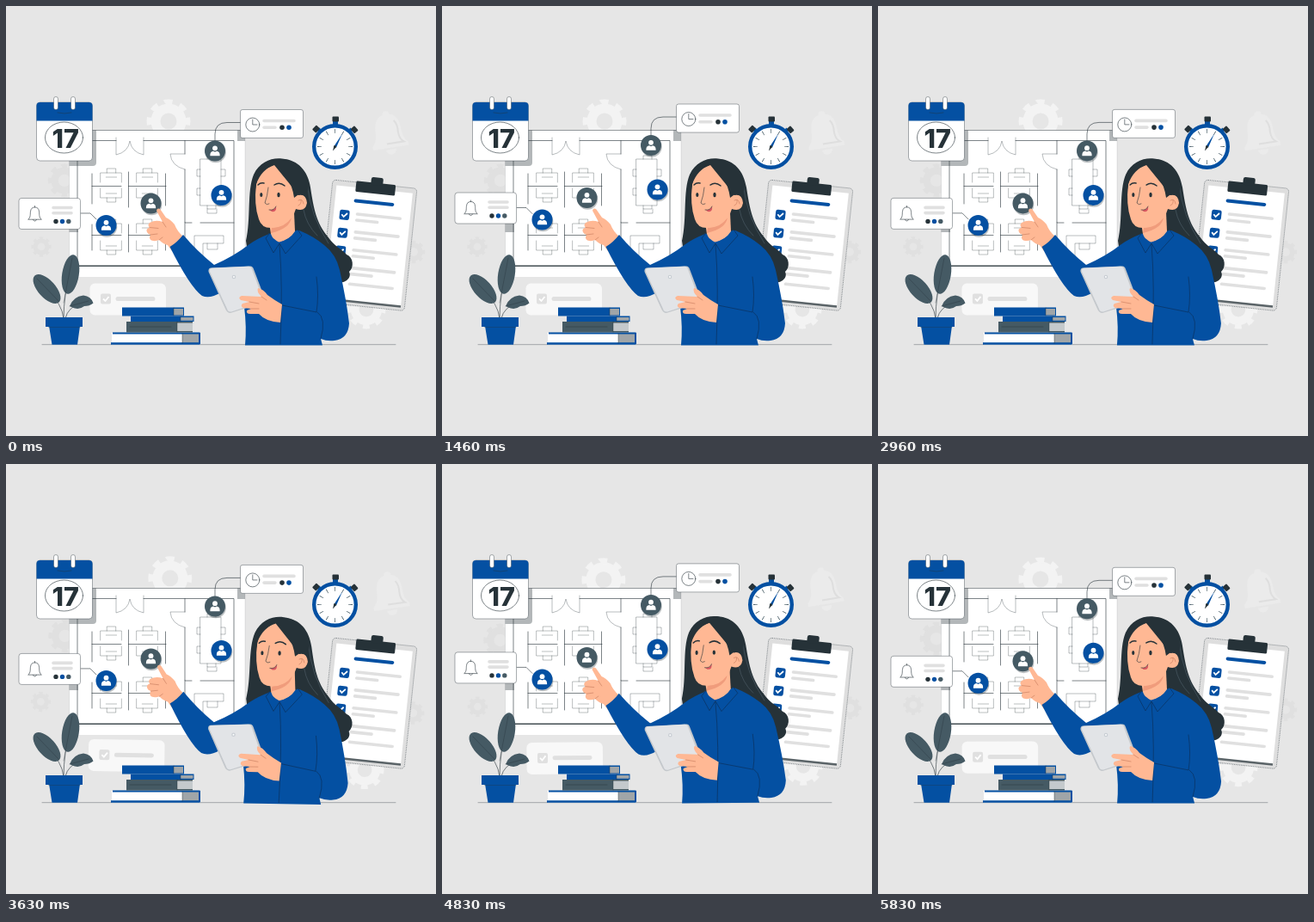
An HTML page that plays this animation: 500x500 px, repeating every 5870 ms.

```html
<!DOCTYPE html>
<html lang="en">
<head>
<meta charset="utf-8">
<title>Office planning</title>
<style>
html, body { margin: 0; width: 100%; height: 100%; overflow: hidden; background: #e6e6e6; }
svg { display: block; width: 100%; height: 100%; }
.blue { fill: #0450a2; }
.dark { fill: #263238; }
.slate { fill: #455a64; }
.white { fill: #fff; }
.grey { fill: #e0e0e0; }
.pages { fill: #a0a5a8; }
.skin { fill: #ffb894; }
.line { fill: none; stroke: #263238; stroke-width: .6; stroke-linecap: round; stroke-linejoin: round; }
.faint { opacity: .55; }
.crease { stroke: #c47a5c; }
.seam { stroke: #0d2c52; }
.bar { fill: none; stroke: #e0e0e0; stroke-width: 3.6; stroke-linecap: round; }
.tick { fill: none; stroke: #fff; stroke-width: 1.8; }
.card { fill: #fff; stroke: #263238; stroke-width: .4; }
.shade { fill: #263238; opacity: .35; }
text { font: 800 30.5px Inter, "Open Sans", sans-serif; }
</style>
</head>
<body>
<svg viewBox="0 0 500 500">
  <defs>
    <g id="gear" fill="none">
      <circle r="15" stroke-width="11"/>
      <circle r="22" stroke-width="7" pathLength="16" stroke-dasharray="1" transform="rotate(-11)"/>
    </g>
    <g id="person" class="white">
      <circle cy="-3.2" r="2.9"/>
      <path d="M-5.6 5.8V4.500Q-5.400 .7-2 .2L0 1.200 2 .2Q5.400 .7 5.600 4.500V5.800Z"/>
    </g>
    <path id="desk" class="line faint" d="M-13 7V-4H13V7M-5-4V-9H6V-4M-6 1H7"/>
    <clipPath id="boardClip"><path d="M73.500 144.500H278V315H73.500Z"/></clipPath>
  </defs>

  <!-- pale background icons -->
  <g id="backdrop">
    <g stroke="#f3f3f3">
      <use href="#gear" x="189" y="134"/>
      <use href="#gear" transform="translate(419 353) scale(.88)"/>
    </g>
    <g stroke="#e0e0e0">
      <use href="#gear" transform="translate(68 203) scale(.76)"/>
      <use href="#gear" transform="translate(41 280) scale(.46)"/>
      <use href="#gear" transform="translate(474 286) scale(.52)"/>
    </g>
    <g transform="translate(445 148) rotate(-9)" fill="#ebebeb">
      <path d="M-4-22A4 4 0 0 1 4-22C13-20 15-11 15-2Q15 7 21 13V17H-21V13Q-15 7-15-2C-15-11-13-20-4-22Z"/>
      <path d="M-6 19H6A6 6 0 0 1-6 19Z"/>
      <path d="M8-14Q12-9 11 0 11 8 16 12H-4" fill="none" stroke="#dedede" stroke-width="2"/>
    </g>
    <rect x="97.500" y="322.500" width="88.500" height="37" rx="6" fill="#f8f8f8"/>
    <rect class="grey" x="110" y="334.500" width="12" height="12" rx="2"/>
    <path class="tick" d="M113 340.500L115.500 343 119.500 338"/>
    <path class="bar" style="stroke-width:5" d="M130 340.500H171"/>
  </g>

  <path class="line" d="M42 393.700H453" opacity=".6"/>

  <!-- floor plan -->
  <path class="white" d="M73.500 144.500H278V315H73.500Z"/>
  <path class="line" d="M73.500 144.500H278" opacity=".8"/>
  <path class="line" d="M278 144.500V315M73.500 315V144.500" opacity=".18"/>
  <path class="line" d="M128 156.500H83V302H265V156.500H160M208 156.500V172M208 190V252H216M226 252H265M208 252V302"/>
  <path d="M83 302.300H265" stroke="#263238"/>
  <path class="line faint" d="M128 153V173Q142 170 144 157Q146 170 160 173V153M208 172H191Q192 186 208 190"/>
  <path class="line" d="M100 209.500H134M100 195V230M142.500 193V234M142.500 209.500H186M185.500 195V232M100 266.500H134M100 254V284M142.500 254V286M142.500 266.500H188M185.500 254V284"/>
  <g id="desks"></g>
  <path class="line faint" d="M226 178H250V232H226ZM234 178V174H244V178M234 232V236H244V232M226 190H222V198H226M226 212H222V220H226M250 190H255V198H250M234 236V241H245V236M219 292V267H253V276H229V292M234 276V283H246V276"/>
  <g clip-path="url(#boardClip)">
    <rect class="shade" x="40" y="118" width="65" height="68" rx="4"/>
    <path class="shade" d="M20 228H84V263H20Z"/>
    <path class="shade" d="M269 124H340V157H269Z"/>
  </g>

  <!-- notification cards and pins -->
  <g id="floating">
    <path class="line" d="M243 157V149Q243 135.500 257 135.500H273M87 241H98L105 248"/>
    <g id="pins"></g>
    <rect class="card" x="272.500" y="120.500" width="73" height="33" rx="2.500"/>
    <circle class="line" cx="286.800" cy="138" r="8"/>
    <path class="line" d="M286.800 132V138H292"/>
    <path class="bar" d="M300 133.500H335M300 141.200H313"/>
    <circle class="dark" cx="321" cy="141.200" r="2.800"/>
    <circle class="blue" cx="329" cy="141.200" r="2.800"/>
    <rect class="card" x="15" y="223.500" width="71.500" height="36" rx="3"/>
    <path class="line" d="M33.500 232.500V234M26 248C29 246 28 241 28.500 239Q29 234 33.500 234Q38 234 38.500 239C39 241 38 246 41 248ZM31.500 248.500Q33.500 252 35.500 248.500"/>
    <path class="bar" d="M55 234.500H76M55 240.700H76"/>
    <circle class="dark" cx="58" cy="250.500" r="2.700"/>
    <circle class="blue" cx="65.500" cy="250.500" r="2.700"/>
    <circle class="slate" cx="72.800" cy="250.500" r="2.700"/>
  </g>

  <!-- calendar -->
  <rect class="card" x="35.500" y="112" width="65" height="68" rx="4"/>
  <path class="blue" d="M35.500 133.500V116Q35.500 112 39.500 112H96.500Q100.500 112 100.500 116V133.500Z"/>
  <path class="line" d="M60 124Q68 126 76 124" opacity=".7"/>
  <rect class="card" x="55.500" y="105.500" width="5" height="15" rx="2.500"/>
  <rect class="card" x="75.500" y="105.500" width="5" height="15" rx="2.500"/>
  <ellipse class="line" cx="67.500" cy="153" rx="22" ry="18"/>
  <text class="dark" x="69.300" y="164.500" text-anchor="middle">17</text>

  <!-- stopwatch -->
  <g transform="translate(382.500 163.500)">
    <path class="blue" d="M-2.500-32H3.500V-24H-2.500Z"/>
    <rect class="dark" x="-3" y="-35" width="7.500" height="6" rx="1"/>
    <path class="blue" d="M-21-19L-18-16-15-19-18-22ZM21-19L18-16 15-19 18-22Z"/>
    <rect class="dark" x="-3.500" y="-33" width="7" height="6" rx="1" transform="rotate(-47)"/>
    <rect class="dark" x="-3.500" y="-33" width="7" height="6" rx="1" transform="rotate(49)"/>
    <circle class="white" r="24.300" stroke="#0450a2" stroke-width="4.400"/>
    <circle r="18" fill="none" stroke="#455a64" stroke-width="5" pathLength="120" stroke-dasharray=".8 9.200" stroke-dashoffset=".4"/>
    <path class="blue" d="M8.500-15L1.500 1-1-.500Z"/>
    <path class="dark" d="M-2.500 5L-1.200-.8 1.200 .8Z"/>
    <circle class="dark" r="1.500"/>
  </g>

  <!-- clipboard -->
  <g transform="translate(380 202) rotate(6)">
    <rect width="98.500" height="143" rx="4" fill="#dedede" stroke="#263238" stroke-width=".5" stroke-dasharray="1 1"/>
    <path class="white" d="M5 6H94V138H5Z"/>
    <path d="M5 138.500H94" stroke="#5b6468" stroke-width="2.500"/>
    <rect class="dark" x="27.500" y="-1.500" width="46" height="12.500" rx="1.500"/>
    <rect class="dark" x="44.500" y="-8" width="14" height="9" rx="2.500"/>
    <path d="M29 21.500H72" stroke="#0450a2" stroke-width="4" stroke-linecap="round"/>
    <g id="tasks"></g>
    <path class="bar" d="M32 118.500H82"/>
  </g>

  <!-- books -->
  <path class="white" d="M123 380H225.500V393.500H123Z"/>
  <path class="pages" d="M205 381H225V392H205Z"/>
  <path class="blue" d="M124 379.500H225.500V381.500H124ZM122 391.300H225.500V393.700H122ZM224 380H226V393H224Z"/>
  <path class="slate" d="M140 367H217V379.500H140Z"/>
  <path d="M199 368.500H217V378H199Z" fill="#c4c9cc"/>
  <path class="blue" d="M145 360.500H218.500V367H145Z"/>
  <path class="pages" d="M203 362H217.500V365.800H203Z"/>
  <path class="blue" d="M135 350.500H207V360.500H135Z"/>
  <path class="pages" d="M195 352H206V359.500H195Z"/>
  <path class="line" opacity=".7" d="M195 351V360M203 361V367M199 367V379M205 381V392M144 373H192"/>

  <!-- plant -->
  <path class="line" d="M67 363Q67 336 75 310M67 363Q65 346 48 330M69 363Q72 350 88 345"/>
  <ellipse class="slate" cx="75" cy="312" rx="9.800" ry="23" transform="rotate(9 75 312)"/>
  <ellipse class="slate" cx="47.500" cy="329" rx="10.200" ry="21" transform="rotate(-42 47.500 329)"/>
  <path class="slate" d="M74 349Q78 338 90 336.500 99 337.500 101.500 345.500 97 349 91 349 86 353 80 351.500 76 350 74 349Z"/>
  <path class="line" d="M67 345L77 293M62 344L36 317M74 349L96 343" opacity=".6"/>
  <path class="blue" d="M50 372H86L83 393.700H53.500ZM46 362H89V373H46Z"/>
  <path class="line" opacity=".5" d="M49.500 373.500H86"/>

  <!-- woman -->
  <g id="woman">
    <path class="dark" d="M279 273C285 248 280 215 288 196 295 181 309 176 321 177.500 340 179 351 192 354 211 358 237 361 252 374 268 382 280 390 282 396 289 404 292 405 304 399 309 403 317 392 324 384 321L350 300 283 300Z"/>
    <path class="line" style="stroke:#50606a" d="M350 207Q354 244 375 276M346 237Q349 254 362 267"/>
    <!-- pointing hand -->
    <path class="skin" d="M206 268Q199 262 196 254 191 248 186 246L179.500 236.500Q176 234 175 238L182 251Q174 248 167 252 164 255 167 257.500 162 259 164 263 164.500 265 168 266 165.500 270 169 272.500 174 274 178 272 183 277 188 278L193 285Z"/>
    <path class="line crease" d="M167 257.500L177 258.500M168 266L176 265M182 251L186 257M178 272L182 269"/>
    <!-- shirt -->
    <path class="blue" d="M206 266Q222 285 242 301 265 291 283 277 293 270 306 265L341 261Q358 268 370 278 384 289 388 307 396 343 399 369 398 387 382 389 373 390 366 387L368 394.500H278Q280 373 277 350L250 333Q237 341 228 337 214 327 190.500 280 199 275 206 266Z"/>
    <!-- face and neck -->
    <path class="skin" d="M306 252L308 265Q311 274 316 275 330 272 336 262L335 240Z"/>
    <path d="M309 258Q324 258 332 246 330 259 308 264Z" fill="#f09c7c"/>
    <path class="skin" d="M312 185Q294 191 291 207 288 231 294 248 297 258 308 258 324 257 334 244L337 236Q348 240 350 229 349 218 340 220L334 212Z"/>
    <path class="dark" d="M313 184C322 191 333 205 335 223L339 220Q345 217 350 224L352 206Q345 181 322 178Q306 177 294 188 285 197 288 225L291 207Q297 190 313 184Z"/>
    <path class="line crease" d="M340 226Q345 223 346 230M340 232Q344 230 343 226"/>
    <ellipse class="dark" cx="296.800" cy="219.500" rx="1.600" ry="2.600"/>
    <ellipse class="dark" cx="317" cy="219.500" rx="1.700" ry="2.700"/>
    <path class="line" style="stroke-width:1.500" d="M293 208Q296 205 300 206M312 208Q318 204 324 209"/>
    <path class="line" d="M305 211Q304 221 301 229 303 232 306 230"/>
    <path d="M306 237Q312 238 314 233 315 240 309 239Z" fill="#d95861"/>
    <path class="line" d="M306 237Q312 238 314 233"/>
    <!-- collar, buttons and folds -->
    <path class="blue" d="M306 264L302 270 311 287 318 276 325 288 344 267 339 260Q330 272 318 275 310 271 306 264Z"/>
    <path class="line seam" d="M306 265L302 270 311 287 318 276 325 288 344 267 339 260M318 277Q322 325 319 393M361 315Q364 337 361 356L321 348M362 356Q373 363 366 387"/>
    <!-- tablet -->
    <path d="M238 304.500L284 302.500Q287 302.500 288 306L299 335Q301 343 296 346L261 357Q257 357 255 352L235.500 309Q235 305 238 304.500Z" fill="#c4c8cc"/>
    <path d="M240 304.800L282 302.800Q285 303 286 306L297 336Q298 342 294 345L262 355.500Q258 356 257 352L237 309Q236 305 240 304.800Z" fill="#e2e4e7"/>
    <circle cx="265" cy="315" r="2.300" fill="#c9ced4"/>
    <circle cx="265" cy="315" r="1" fill="#fff"/>
    <!-- holding hand -->
    <path class="skin" d="M321 347Q312 342 304 336 299 329 293 328 291 332 297 338L274 337Q269 339 273 342L283 344 275 346Q272 349 276 351L285 352 280 354Q279 358 284 358L294 358Q302 367 319 368Z"/>
    <path class="line crease" d="M283 344L294 346M285 352L294 352M297 338L303 342"/>
  </g>
</svg>
<script>
const $ = id => document.getElementById(id);
const fill = (id, items, draw) => { $(id).innerHTML = items.map(draw).join(''); };

fill('pins', [[243, 168.5, 'slate'], [168.5, 229.5, 'slate'], [250.5, 220, 'blue'], [116.5, 255, 'blue']],
  ([x, y, tone]) => `<g transform="translate(${x} ${y})">
    <circle cx=".8" cy="1.8" r="12" fill="#263238" opacity=".3"/>
    <circle class="${tone}" r="12"/><use href="#person"/></g>`);

// Desks face each other across the partitions
const desks = [122, 164].flatMap(x =>
  [[198, 1], [219, -1], [257, 1], [280, -1]].map(([y, side]) => [x, y, side]));
fill('desks', desks,
  ([x, y, side]) => `<use href="#desk" transform="translate(${x} ${y}) scale(.95 ${side})"/>`);

fill('tasks', [0, 21, 42, 63], y => `<g transform="translate(0 ${y})">
  <rect class="blue" x="12" y="33.5" width="11.5" height="11.5" rx="2.5"/>
  <path class="tick" d="M14.500 39L17 41.500 21 37"/>
  <path class="bar" d="M32.500 36.800H82.500M32.500 43.800H56.500"/></g>`);

const PERIOD = 2935;
// Straight ramps: 0 → 1 → 0, and 0 → 1 → -1 → 0
const rise = p => 1 - Math.abs(1 - 2 * p);
const sway = p => p < .25 ? 4 * p : p < .75 ? 2 - 4 * p : 4 * p - 4;

function frame() {
  const p = performance.now() % PERIOD / PERIOD;
  $('floating').setAttribute('transform', `translate(0 ${-6.5 * rise(p)})`);
  $('woman').setAttribute('transform', `rotate(${sway(p)} 283 286)`);
  $('backdrop').setAttribute('transform', `rotate(${sway(p)} 258 242)`);
  requestAnimationFrame(frame);
}
frame();
</script>
</body>
</html>
```
